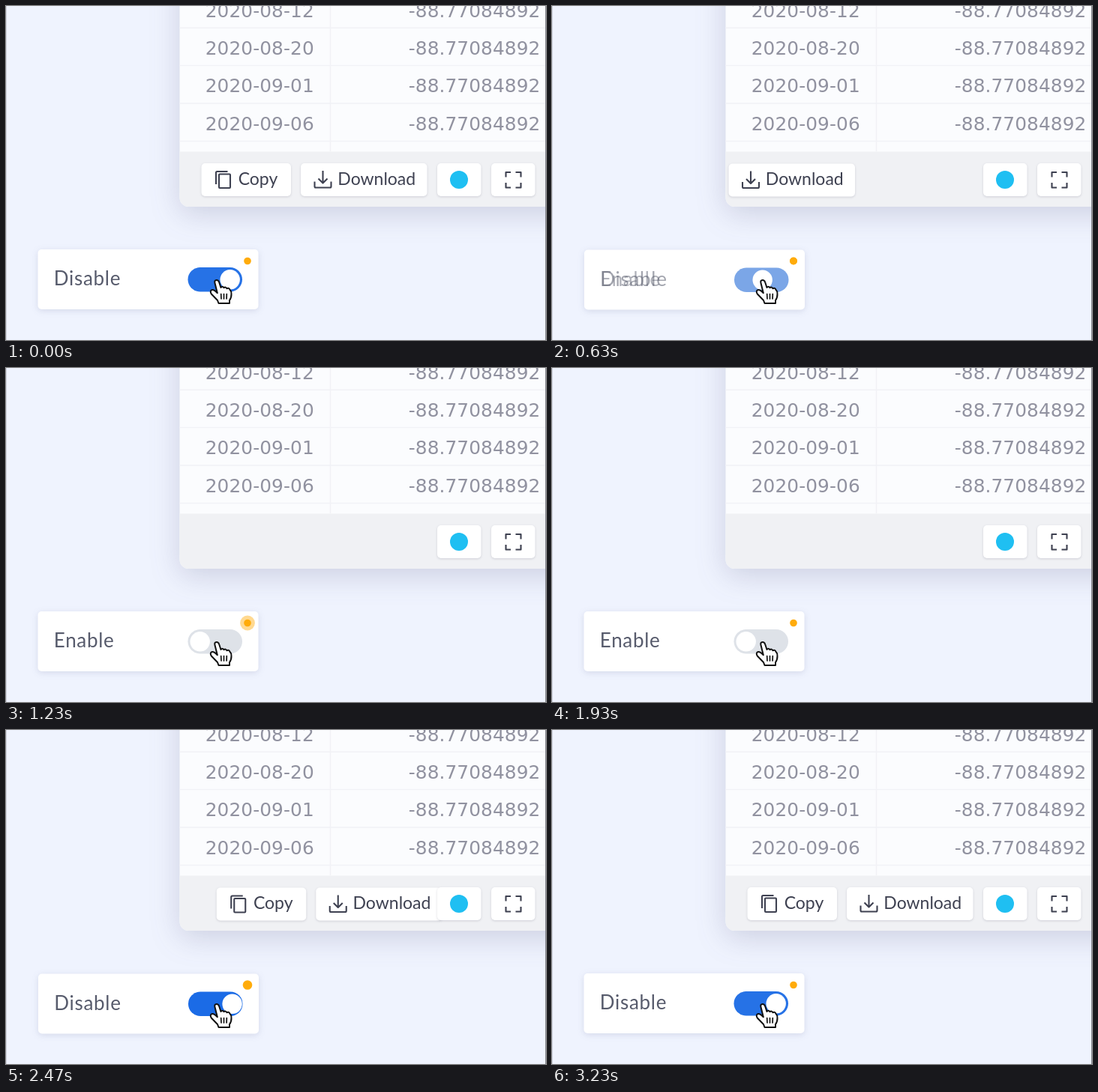
Animation of 720 by 446 pixels, one loop 3330 ms. Source, as an HTML page:

```html
<!DOCTYPE html>
<html lang="en">
<head>
<meta charset="utf-8">
<title>Toggle toolbar buttons</title>
<style>
  html, body { margin: 0; width: 100%; height: 100%; overflow: hidden; background: #eff3fe; }
  svg { display: block; width: 720px; height: 446px; }
  .panel { fill: #fbfcfe; filter: drop-shadow(0 9px 19px rgba(66, 64, 108, .2)); }
  .button { fill: #fff; filter: drop-shadow(0 1px 1.5px rgba(40, 44, 70, .17)); }
  .card { fill: #fff; filter: drop-shadow(0 2px 4px rgba(60, 66, 110, .14)); }
  .grid { stroke: #f1f2f6; stroke-width: 1.5; }
  .icon { fill: none; stroke: #3e4151; stroke-width: 2.1; stroke-linejoin: round; }
  .cells { font: 24.8px "DejaVu Sans", sans-serif; letter-spacing: .1px; fill: #9192a0; }
  .action { font: 23px Lato, sans-serif; fill: #3e4151; }
  .label { font: 26px Lato, sans-serif; letter-spacing: .7px; fill: #575b6c; }
</style>
</head>
<body>
<svg viewBox="0 0 720 446">
  <defs>
    <clipPath id="footerClip"><path d="M231.500 195H720V268H243.500a12 12 0 0 1-12-12z"/></clipPath>
  </defs>
  <rect width="720" height="446" fill="#eff3fe"/>
  <rect class="panel" x="231.500" y="-100" width="600" height="368" rx="12"/>
  <g id="table"></g>
  <path d="M231.500 194.500H720V268H243.500a12 12 0 0 1-12-12z" fill="#f0f1f4"/>

  <g clip-path="url(#footerClip)">
    <g id="actions">
      <rect class="button" x="260.500" y="210" width="119.500" height="44" rx="5"/>
      <path class="icon" d="M285 224.500h13q1 0 1 1v16.500q0 1-1 1h-13q-1 0-1-1v-16.500q0-1 1-1zM280 238v-15.500q0-1.500 1.500-1.500h14"/>
      <text class="action" x="309.700" y="238.500">Copy</text>
      <rect class="button" x="393" y="210" width="168.500" height="44" rx="5"/>
      <path class="icon" d="M422.500 220v16M416.500 230.500l6 6l6-6M411.500 234.500v6.500q0 1.500 1.500 1.500h19q1.500 0 1.500-1.500v-6.500"/>
      <text class="action" x="442.300" y="238.500">Download</text>
    </g>
  </g>

  <rect class="button" x="575" y="210" width="58.500" height="44" rx="5"/>
  <circle cx="604" cy="232" r="12" fill="#1fbff2"/>
  <rect class="button" x="647" y="210" width="58.500" height="44" rx="5"/>
  <path class="icon" d="M666.500 228.500v-6.500h6.500M679.500 222h7v6.500M686.500 236v6.500h-7M673 242.500h-6.500v-6.500"/>

  <g id="control">
    <rect class="card" x="42.500" y="325" width="294" height="80" rx="5"/>
    <text class="label" id="disable" x="63.800" y="373">Disable</text>
    <text class="label" id="enable" x="63.800" y="373">Enable</text>
    <rect id="track" x="242.500" y="349" width="72.500" height="32.500" rx="16.250"/>
    <circle id="knob" cy="365.300" r="13.200" fill="#fff"/>
  </g>
  <circle id="halo" cx="322" cy="340.500" fill="#ffab0a"/>
  <circle cx="322" cy="340.500" r="4.800" fill="#ffab0a"/>

  <g stroke="#111" stroke-width="2" stroke-linejoin="round" stroke-linecap="round">
    <path fill="#fff" d="M278.500 370Q277.500 366 280.700 366Q283.300 366 284.200 369L286.500 376Q288.500 373.500 290.500 376.200Q292.800 374.500 294.500 377.300Q297 375.800 298.500 378.700Q300.500 380.500 300.500 384.500Q300.700 389.500 298 393V397H283.500L282 393L273.800 384.500Q271.500 380.700 274.300 379.200Q277 378.200 281.800 383.200z"/>
    <path fill="none" stroke-width="1.700" d="M286.700 384.500l.3 6.500M290.500 384.500v6.500M294.300 384.500l-.2 6.500"/>
  </g>
  <path d="M.5 0V446" stroke="#d0d3e0"/>
  <path d="M719.500 0V446" stroke="#85868f"/>
</svg>
<script>
const LOOP = 3330;
const HIDE = { start: 341, length: 549, ease: bezier(0.7, -0.4, 0.4, 1.4) };
const SHOW = { start: 2155, length: 490, ease: bezier(0.45, 1.45, 0.8, 1) };
const PULSES = [620, 2380];
const PULSE_LENGTH = 850;
const SLIDE = 340;
const ON = [38, 114, 230];
const OFF = [222, 226, 232];

const $ = id => document.getElementById(id);
const clamp = v => Math.min(1, Math.max(0, v));
const mix = (a, b, k) => a + (b - a) * k;

function bezier(x1, y1, x2, y2) {
  const at = (a, b, s) => 3 * (1 - s) ** 2 * s * a + 3 * (1 - s) * s * s * b + s ** 3;
  return t => {
    if (t <= 0 || t >= 1) return clamp(t);
    let lo = 0, hi = 1;
    for (let i = 0; i < 24; i++) {
      const mid = (lo + hi) / 2;
      if (at(x1, x2, mid) < t) lo = mid; else hi = mid;
    }
    return at(y1, y2, lo);
  };
}

const run = (move, t) => move.ease((t - move.start) / move.length);
const active = (move, t) => t >= move.start && t < move.start + move.length;

function buildTable() {
  const dates = ["2020-08-12", "2020-08-20", "2020-09-01", "2020-09-06"];
  $("table").innerHTML = '<path class="grid" d="M432.500 0V194"/>' + dates.map((date, i) => {
    const y = 14.600 + i * 50.400;
    return `<path class="grid" d="M231.500 ${y + 14.600}H720"/>
      <g class="cells"><text x="265.700" y="${y}">${date}</text>
      <text x="712.500" y="${y}" text-anchor="end">-88.77084892</text></g>`;
  }).join("");
}

function draw(t) {
  // 0 = switched on with buttons shown, 1 = switched off; overshoots both ways
  const off = run(HIDE, t) - run(SHOW, t);
  const nudge = active(HIDE, t) || active(SHOW, t) ? 0.5 : 0;

  $("actions").setAttribute("transform", `translate(${-SLIDE * off} ${nudge})`);
  $("control").setAttribute("transform", `translate(${nudge} ${nudge})`);
  $("knob").setAttribute("cx", mix(298.7, 258.7, off));
  $("track").setAttribute("fill", `rgb(${ON.map((c, i) => Math.round(mix(c, OFF[i], off)))})`);
  $("disable").setAttribute("opacity", clamp(1 - off));
  $("enable").setAttribute("opacity", clamp(off));

  const start = PULSES.find(s => t >= s && t < s + PULSE_LENGTH);
  const p = start === undefined ? 1 : (t - start) / PULSE_LENGTH;
  $("halo").setAttribute("r", 4.8 + 5.2 * (1 - (1 - p) ** 3));
  $("halo").setAttribute("opacity", 1 - p ** 1.8);
}

buildTable();
const origin = performance.now();
function frame() {
  draw((performance.now() - origin) % LOOP);
  requestAnimationFrame(frame);
}
frame();
</script>
</body>
</html>
```
